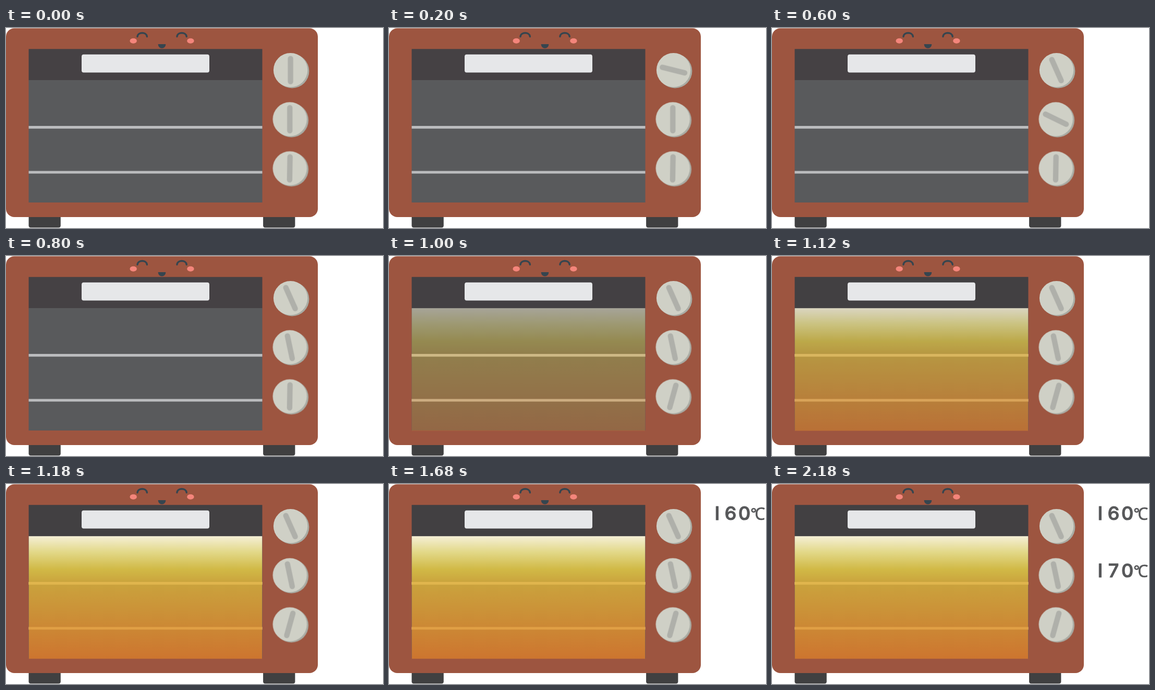
An HTML page that plays this animation: 723 px wide and 384 px high, repeating every 3180 ms.

```html
<!DOCTYPE html>
<html lang="en">
<head>
<meta charset="utf-8">
<title>Toaster oven</title>
<style>
  html, body { margin: 0; width: 100%; height: 100%; overflow: hidden; background: #fff; }
  svg { display: block; width: 723px; height: 384px; }

  .bar { stroke: #afb0aa; stroke-width: 10.4; stroke-linecap: round; }
  .anim { animation: 3180ms step-end infinite; }
  #bar1 { animation-name: turn1; }
  #bar2 { animation-name: turn2; }
  #bar3 { animation-name: turn3; }
  #lit { animation-name: glow; }
  #temp1 { animation-name: show1; }
  #temp2 { animation-name: show2; }

  .eye { fill: none; stroke: #35454f; stroke-width: 3.4; stroke-linecap: round; }
  .temp { fill: #57585a; stroke: #57585a; stroke-linejoin: round; }
  .digits { font: 500 36px Inter, sans-serif; text-anchor: middle; stroke-width: 1.2; }
  .degree { font: 600 27px "Noto Sans", "Open Sans", sans-serif; stroke-width: 0; }
  .unit { font: 500 32px "Noto Sans", "Open Sans", sans-serif; stroke-width: .5; }

  @keyframes turn1 {
    0% { transform: rotate(0deg); }
    6.289% { transform: rotate(-76deg); }
    12.578%, 100% { transform: rotate(-24deg); }
  }
  @keyframes turn2 {
    0% { transform: rotate(0deg); }
    18.867% { transform: rotate(-64deg); }
    25.157%, 100% { transform: rotate(-12deg); }
  }
  @keyframes turn3 {
    0% { transform: rotate(1deg); }
    31.446%, 100% { transform: rotate(15.5deg); }
  }
  @keyframes glow {
    0% { opacity: 0; }
    31.446% { opacity: .5; animation-timing-function: steps(6, end); }
    37.106%, 100% { opacity: 1; }
  }
  @keyframes show1 {
    0% { opacity: 0; }
    52.83%, 100% { opacity: 1; }
  }
  @keyframes show2 {
    0% { opacity: 0; }
    68.553%, 100% { opacity: 1; }
  }
</style>
</head>
<body>
<svg viewBox="0 0 723 384">
  <defs>
    <linearGradient id="heat" x1="0" y1="0" x2="0" y2="1">
      <stop offset="0" stop-color="#f5efd5"/>
      <stop offset=".13" stop-color="#e2d888"/>
      <stop offset=".27" stop-color="#d1b946"/>
      <stop offset=".38" stop-color="#caa33d"/>
      <stop offset="1" stop-color="#cd752f"/>
    </linearGradient>
    <g id="knob">
      <circle cx="3" cy="2" r="32.8" fill="#a9aba3"/>
      <circle r="32.7" fill="#cfd0c6"/>
    </g>
    <path id="foot" d="M0 360h61.3v19.3a4 4 0 0 1-4 4h-53.3a4 4 0 0 1-4-4z" fill="#404041"/>
    <path id="eye" class="eye" d="M-9.2 16.5C-8 7.2 8 7.2 9.2 16.5"/>
    <g id="celsius">
      <text class="degree" x="693.5" y="64.5">°</text>
      <text class="unit" x="701.2" y="69">C</text>
    </g>
  </defs>

  <use href="#foot" x="43.5"/>
  <use href="#foot" x="493.1"/>
  <rect y=".5" width="598" height="362.5" rx="16" fill="#9d5540"/>

  <use href="#eye" x="261.2"/>
  <use href="#eye" x="337.1"/>
  <g fill="#f4857b">
    <ellipse cx="244.2" cy="24.7" rx="6.7" ry="5"/>
    <ellipse cx="353.9" cy="24.7" rx="6.7" ry="5"/>
  </g>
  <path d="M291.7 31h14.6c0 10.6-14.6 10.6-14.6 0z" fill="#35454f"/>

  <rect x="43.5" y="40.3" width="448" height="60" fill="#454144"/>
  <rect x="43.5" y="100" width="448" height="235" fill="#595a5c"/>
  <path d="M43.5 190.6h448M43.5 277h448" stroke="#bbbcbe" stroke-width="5.2"/>

  <g id="lit" class="anim">
    <rect x="44" y="40.6" width="447" height="60" fill="#424042"/>
    <rect x="43.7" y="100.2" width="447.5" height="235.3" fill="url(#heat)"/>
    <path d="M43.5 190.6h448" stroke="#e0b54d" stroke-width="5.2"/>
    <path d="M43.5 277h448" stroke="#e09f45" stroke-width="5.2"/>
  </g>
  <rect x="145" y="50.8" width="245" height="34.8" rx="4" fill="#e6e7e9"/>

  <g transform="translate(545.6 80.8)">
    <use href="#knob"/>
    <path id="bar1" class="bar anim" d="M0-22V22"/>
  </g>
  <g transform="translate(544.3 175.1)">
    <use href="#knob"/>
    <path id="bar2" class="bar anim" d="M0-22V22"/>
  </g>
  <g transform="translate(544.3 269.5)">
    <use href="#knob"/>
    <path id="bar3" class="bar anim" d="M0-22V22"/>
  </g>

  <!-- The leading one is a plain stroke, so a capital I stands for it -->
  <g id="temp1" class="temp anim" role="img" aria-label="160 °C">
    <text class="digits" x="629.5 655 681.5" y="69">I60</text>
    <use href="#celsius"/>
  </g>
  <g id="temp2" class="temp anim" role="img" aria-label="170 °C">
    <text class="digits" x="629.5 655 681.5" y="179">I70</text>
    <use href="#celsius" y="110"/>
  </g>
</svg>
</body>
</html>
```
